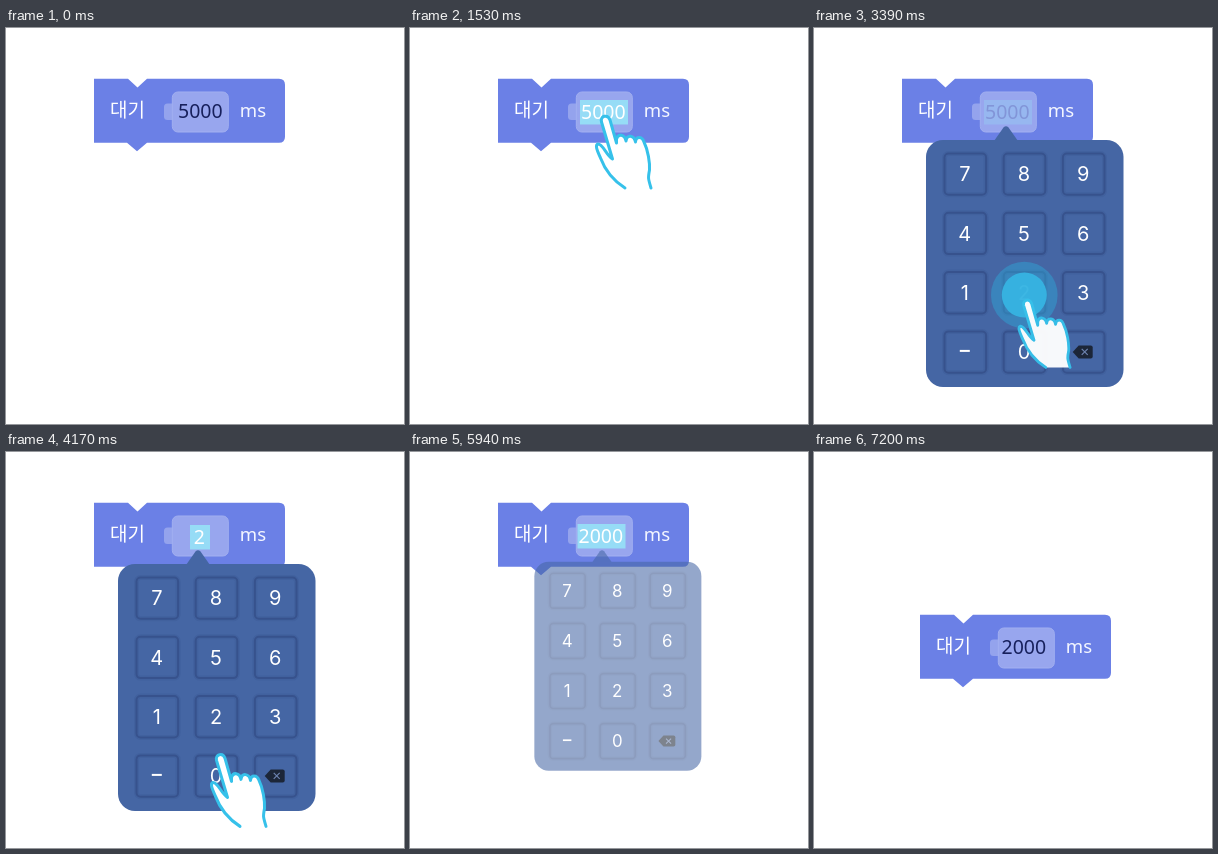
These frames come from a looping animation (398x396 px, 8 s). An HTML page:

```html
<!DOCTYPE html>
<html lang="ko">
<head>
<meta charset="utf-8">
<title>대기 블록</title>
<style>
html, body { margin: 0; width: 100%; height: 100%; overflow: hidden; background: #fff; }
svg { display: block; width: 398px; height: 396px; }
.label { font: 300 19px "Noto Sans CJK KR", "Noto Sans CJK", sans-serif; fill: #fff; }
.unit { font: 400 18.6px "Noto Sans", sans-serif; fill: #f4f6ff; }
.value { font: 400 19.5px "Noto Sans", sans-serif; text-anchor: middle; }
.key { font: 400 20px Inter, sans-serif; fill: #fff; text-anchor: middle; }
</style>
</head>
<body>
<svg viewBox="0 0 398 396">
  <g id="block">
    <path fill="#6b80e6" d="M88 50.700H122L131.500 59.500L141 50.700H273Q279 50.700 279 56.700V108.700Q279 114.700 273 114.700H141L131 123.200L121 114.700H88Z"/>
    <text class="label" x="104" y="89">대기</text>
    <text class="unit" x="233.800" y="88.700">ms</text>
    <rect x="158" y="75.500" width="12" height="16.500" rx="3.500" fill="#94a3ed"/>
    <rect x="166.300" y="64" width="56" height="40" rx="5.500" fill="#98a6ee" stroke="#a2aff0"/>
    <rect id="mark" fill="#96dcf6"/>
    <text id="value" class="value"></text>
  </g>
  <g id="pad">
    <path fill="#4566a4" d="M180 113L189.500 99.500Q192 97 194.500 99.500L204 113Z"/>
    <rect x="112" y="112" width="197.500" height="247" rx="17" fill="#4566a4"/>
    <g id="keys"></g>
  </g>
  <g id="ripple">
    <circle id="halo" fill="#2fa6d6" fill-opacity=".48"/>
    <circle id="dot" fill="#36b5e3" fill-opacity=".93"/>
  </g>
  <path id="hand" fill="#fff" stroke="#36c1ea" stroke-width="3" stroke-linecap="round" stroke-linejoin="round"
    d="M215 160C204 153 195 142 190.500 130C187.500 123 184.500 117 188 116C193 116 196 127 202.500 131L191.500 94C190 87.500 198 86 200 92L206.500 115V111C208 105.500 214.500 106 216 113C217 106 224 107 225.500 114C226 108 232 108 234 114C238 122 240 135 239.500 142C238 150 238 150 241 160"/>
</svg>
<script>
const LOOP = 8000;
const TAPS = [3270, 4350, 4740, 5130];
const el = id => document.getElementById(id);
const set = (node, attrs) => { for (const k in attrs) node.setAttribute(k, attrs[k]); };
const add = (tag, attrs, text = "") => {
  const node = document.createElementNS("http://www.w3.org/2000/svg", tag);
  set(node, attrs);
  node.textContent = text;
  el("keys").append(node);
};

"789456123-0<".split("").forEach((ch, i) => {
  const x = 151.3 + 59.2 * (i % 3), y = 146 + 59.3 * Math.floor(i / 3);
  const box = { x: x - 20.8, y: y - 20.5, width: 41.6, height: 41.3, rx: 4, fill: "none", stroke: "#35518b" };
  add("rect", { ...box, "stroke-width": 5, "stroke-opacity": 0.25 });
  add("rect", { ...box, "stroke-width": 2, "stroke-opacity": 0.85 });
  if (ch === "-") {
    add("rect", { x: x - 5.5, y: y - 2, width: 10, height: 2, fill: "#fff" });
  } else if (ch === "<") {
    add("path", { d: `M${x - 11} ${y}l6 -6.500h12q2 0 2 2v9q0 2 -2 2h-12z`, fill: "#1c2638" });
    add("path", { d: `M${x - 2} ${y - 3}l6 6m0 -6l-6 6`, stroke: "#6d83b0", "stroke-width": 1.2 });
  } else {
    add("text", { class: "key", x: x - 0.5, y: y + 7.3 }, ch);
  }
});

const clamp = v => Math.max(0, Math.min(1, v));
const smooth = p => p * p * (3 - 2 * p);
const linear = p => p;
const ramp = (t, a, b) => clamp((t - a) / (b - a));

// Eased value from [time, value] pairs
function track(t, steps, ease = smooth) {
  if (t <= steps[0][0]) return steps[0][1];
  for (let i = 1; i < steps.length; i++) {
    const [a, u] = steps[i - 1], [b, v] = steps[i];
    if (t <= b) return u + (v - u) * ease((t - a) / (b - a));
  }
  return steps[steps.length - 1][1];
}

// cubic-bezier(.33, 0, .1, 1)
function glide(p) {
  let lo = 0, hi = 1;
  for (let i = 0; i < 24; i++) {
    const s = (lo + hi) / 2, r = 1 - s;
    if (r * r * s * 0.99 + r * s * s * 0.3 + s * s * s < p) lo = s; else hi = s;
  }
  return smooth(lo);
}

function drawField(t) {
  const selected = t >= 1290 && t < 6060;
  const typed = [3430, 4390, 4770, 5190].filter(at => t >= at).length;
  const text = typed ? "2000".slice(0, typed) : "5000";
  const swap = t >= 3330 && t < 3430;
  const width = [48, 20, 31, 42, 48][typed];
  const dx = typed === 4 ? -2.5 : 0;
  const dy = typed && typed < 4 ? 1 : 0;
  set(el("mark"), {
    x: 194 + dx - width / 2, y: 72 + dy, width, height: 24.5,
    opacity: selected ? (swap ? 0.3 : 1) : 0
  });
  const value = el("value");
  set(value, {
    x: (selected ? 193.3 : 194.3) + dx, y: selected ? 91 + dy : 90,
    fill: !selected ? "#17205c" : swap ? "#8295d8" : "#fff"
  });
  if (value.textContent !== text) value.textContent = text;
}

function drawHand(t) {
  let x, y, opacity;
  if (t < 2300) {
    const p = smooth(ramp(t, 400, 1230));
    x = 195 + 14 * (1 - p);
    y = 88 + 45 * (1 - p);
    opacity = track(t, [[330, 0], [560, 1], [1920, 1], [2170, 0]], linear);
  } else {
    const p = smooth(ramp(t, 4050, 4290));
    x = 213 + 2 * p;
    y = 272 + 60 * p;
    opacity = track(t, [[2640, 0], [2900, 0.96], [3400, 0.96], [3500, 1], [5370, 1], [5600, 0]], linear);
  }
  let scale = 1;
  for (const tap of TAPS) scale = Math.min(scale, track(t - tap, [[-90, 1], [60, 0.87], [180, 1]]));
  set(el("hand"), { opacity, transform: `translate(${x} ${y}) scale(${scale}) translate(-195 -88)` });
}

function drawRipple(t) {
  const tap = TAPS.find(at => t >= at && t < at + 330);
  if (tap === undefined) return set(el("ripple"), { opacity: 0 });
  const age = t - tap;
  const r = track(age, [[0, 0], [60, 16], [120, 22.5], [330, 26]], linear);
  const at = { cx: 210.3, cy: tap === TAPS[0] ? 267 : 323 };
  set(el("dot"), { ...at, r });
  set(el("halo"), { ...at, r: r * 1.48 });
  set(el("ripple"), { opacity: 1 - ramp(age, 130, 330) });
}

function drawPad(t) {
  const scale = track(t, [[1860, 0.6], [2040, 0.985], [2130, 1.025], [2280, 1], [5760, 1], [5850, 1.01], [6060, 0.6]]);
  const opacity = track(t, [[1860, 0], [2040, 0.94], [2130, 1], [5850, 1], [6060, 0]], linear);
  set(el("pad"), { opacity, transform: `translate(192 98) scale(${scale}) translate(-192 -98)` });
}

function draw(t) {
  const p = glide(ramp(t, 6276, 7170));
  set(el("block"), { transform: `translate(${18 * p} ${112 * p})` });
  drawField(t);
  drawPad(t);
  drawRipple(t);
  drawHand(t);
}

const start = performance.now();
function tick() {
  draw((performance.now() - start) % LOOP);
  requestAnimationFrame(tick);
}
tick();
</script>
</body>
</html>
```
